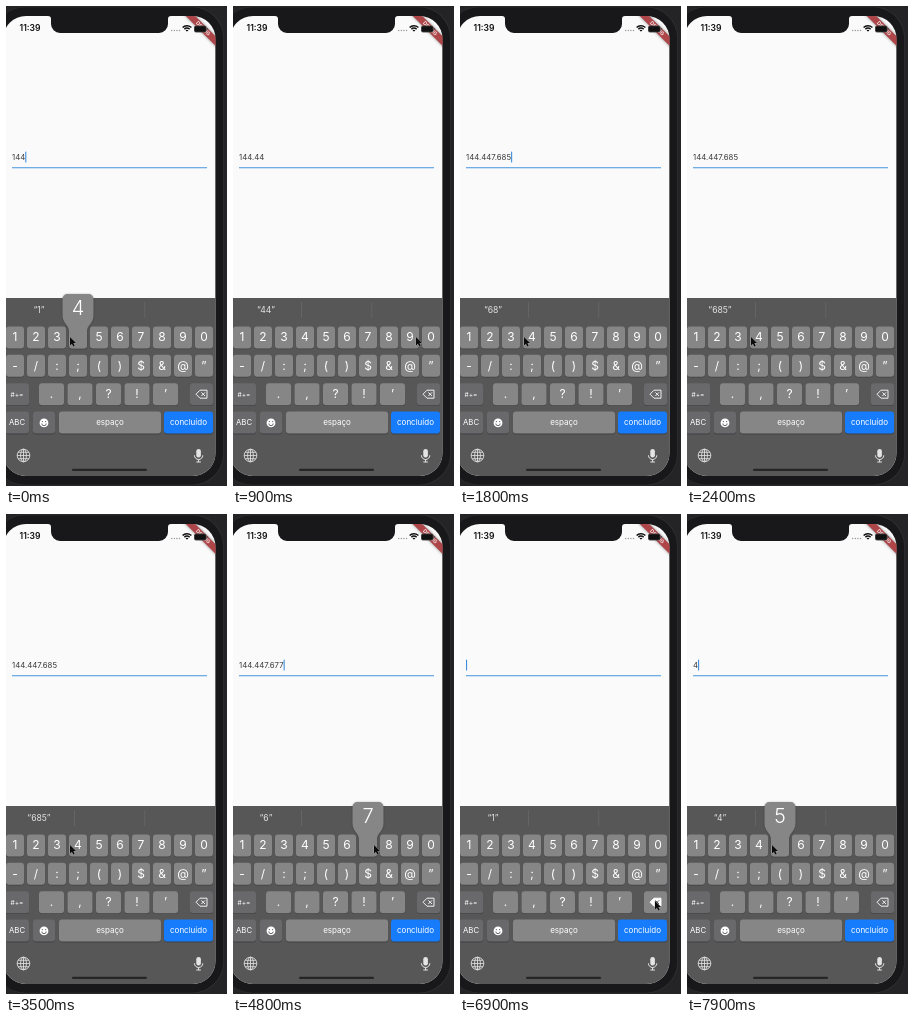
An HTML page with a canvas for the animation above (8 s loop, 221 by 480 pixels).

```html
<!DOCTYPE html>
<html lang="pt">
<head>
<meta charset="utf-8">
<title>Masked number field</title>
<style>
html, body { margin: 0; width: 100%; height: 100%; overflow: hidden; background: #18181a; }
canvas { display: block; width: 221px; height: 480px; }
</style>
</head>
<body>
<canvas id="stage"></canvas>
<script>
const W = 221, H = 480, LOOP = 8000, STEP = 100;
const SANS = "Inter, 'Liberation Sans', sans-serif";
const KEY = "#868687", DARK_KEY = "#69696b", BOARD = "#575758", BLACK = "#18181a", ICON = "#e4e4e4";
const SCREEN_W = 209.6;
const rowY = row => 320.4 + 28.4 * row;

const canvas = document.getElementById("stage");
const ratio = window.devicePixelRatio || 1;
canvas.width = W * ratio;
canvas.height = H * ratio;
const c = canvas.getContext("2d");
c.scale(ratio, ratio);

// Every press drives the field, the lit key and the pointer; "<" erases.
const run = (keys, start, gap) => [...keys].map((key, i) => ({ key, at: start + i * gap }));
const presses = [
  ...run("4444", -200, 100),
  ...run("9", 500),
  ...run("7685", 1000, 200),
  ...run("4", 2000),
  ...run("<<", 3600, 200),
  ...run("77", 4600, 100),
  ...run("<", 5600),
  ...run("<".repeat(10), 5900, 100),
  ...run("45", 7600, 300)
];
const entered = t => presses.filter(p => p.at + 100 <= t);
const isLit = (p, t) => t >= p.at && t - p.at < (p.key === "<" ? 300 : 200);
const digitX = digit => digit * 21 - 12;

function digitsAt(t) {
  return entered(t).reduce((s, { key }) => key === "<" ? s.slice(0, -1) : s + key, "1");
}

function mask(digits) {
  const groups = (digits.slice(0, 9).match(/.{1,3}/g) || []).join(".");
  return digits.length > 9 ? groups + "-" + digits.slice(9) : groups;
}

// The tip rests on the outer side of the digit keys.
function tipFor(key) {
  return key === "<" ? [195, 387] : [digitX(key) + (key > 5 ? 6 : -8), 331];
}

function pointerAt(t) {
  const i = presses.findLastIndex(p => p.at <= t);
  const from = presses[i], to = presses[i + 1] || from;
  const travel = Math.min(500, (to.at - from.at) / 2) || 1;
  const u = Math.min(1, Math.max(0, (t - from.at - 100) / travel));
  const ease = 1 - (1 - u) ** 3;
  const [x0, y0] = tipFor(from.key), [x1, y1] = tipFor(to.key);
  return [x0 + (x1 - x0) * ease, y0 + (y1 - y0) * ease];
}

function box(x, y, w, h, r, fill) {
  c.beginPath();
  c.roundRect(x, y, w, h, r);
  c.fillStyle = fill;
  c.fill();
}

function disc(x, y, r, fill) {
  box(x - r, y - r, 2 * r, 2 * r, r, fill);
}

function line(color, width, ...pts) {
  c.beginPath();
  pts.forEach(p => c.lineTo(...p));
  c.strokeStyle = color;
  c.lineWidth = width;
  c.stroke();
}

function arc(x, y, r, from, to, color, width) {
  c.beginPath();
  c.arc(x, y, r, from, to);
  c.strokeStyle = color;
  c.lineWidth = width;
  c.stroke();
}

function label(text, x, y, font, color = "#fff", align = "center") {
  c.font = font;
  c.fillStyle = color;
  c.textAlign = align;
  c.textBaseline = "middle";
  c.fillText(text, x, y);
}

function key(text, x, row, w, size = 12, fill = KEY) {
  const y = rowY(row);
  box(x, y + .8, w, 22, 3, "#414142");
  box(x, y, w, 22, 3, fill);
  label(text, x + w / 2, y + 11.4, `${size}px ${SANS}`);
}

function ribbon() {
  c.save();
  c.translate(197, 22.5);
  c.rotate(Math.PI / 4);
  c.shadowColor = "rgba(0,0,0,.5)";
  c.shadowBlur = 3;
  c.fillStyle = "#ae4548";
  c.fillRect(-30, -3.3, 60, 6.6);
  c.shadowBlur = 0;
  label("DEBUG", 0, .2, `bold 5.2px ${SANS}`, "#f1dede");
  c.restore();
}

function statusBar() {
  label("11:39", 24, 22.9, `600 8.6px ${SANS}`, "#111");
  for (let i = 0; i < 4; i++) disc(165.7 + i * 2.6, 24.4, .75, "#999");
  for (const r of [1.2, 3.6, 6]) arc(181, 25.7, r, -Math.PI * .76, -Math.PI * .24, "#111", 1.5);
  box(188, 19.5, 12.5, 7, 2, "#555");
  box(188.7, 20.2, 11.1, 5.6, 1.4, "#111");
  box(200.9, 21.7, .9, 2.5, .5, "#555");
}

function notch() {
  const left = 45, right = 162, top = 10, flare = 3;
  c.beginPath();
  c.roundRect(left, top - 10, right - left, 27, 9);
  for (const [x, side] of [[left, -1], [right, 1]]) {
    c.moveTo(x + side * flare, top);
    c.quadraticCurveTo(x, top, x, top + flare);
    c.lineTo(x, top);
  }
  c.fillStyle = BLACK;
  c.fill();
}

function field(t) {
  const text = mask(digitsAt(t));
  label(text, 6, 151.4, `7.8px ${SANS}`, "#3a3a3a", "left");
  const end = 6 + c.measureText(text).width;
  const idle = t - entered(t).pop().at - 100;
  if (Math.floor(idle / 500) % 2 === 0) box(end, 145.5, 1.1, 11, .5, "#3d8edc");
  box(6, 161.2, 195, 1.1, 0, "#4293dc");
}

function eraseKey(lit) {
  const y = rowY(2) + 11;
  key("", 184, 2, 23, 8, lit ? KEY : DARK_KEY);
  c.beginPath();
  [[190, 0], [194, -4], [201, -4], [201, 4], [194, 4]].forEach(([x, dy]) => c.lineTo(x, y + dy));
  c.closePath();
  c.lineJoin = "round";
  c.strokeStyle = c.fillStyle = "#fff";
  c.lineWidth = .9;
  c.stroke();
  if (lit) c.fill();
  for (const d of [-1.8, 1.8]) line(lit ? "#444" : "#fff", .9, [195.4, y - d], [199, y + d]);
}

function smiley() {
  const y = rowY(3) + 11.3;
  key("", 27, 3, 22, 8, DARK_KEY);
  disc(38, y, 4.4, "#fff");
  for (const x of [36.4, 39.6]) disc(x, y - 1.3, .7, DARK_KEY);
  arc(38, y + .6, 2.2, 0, Math.PI, DARK_KEY, 1);
}

function globe() {
  const x = 17.5, y = 449.5, r = 6.3;
  for (const rx of [r, r * .46]) {
    c.beginPath();
    c.ellipse(x, y, rx, r, 0, 0, 7);
    c.strokeStyle = ICON;
    c.lineWidth = .85;
    c.stroke();
  }
  line(ICON, .85, [x, y - r], [x, y + r]);
  for (const dy of [-3.2, 0, 3.2]) {
    const half = Math.sqrt(r * r - dy * dy);
    line(ICON, .8, [x - half, y + dy], [x + half, y + dy]);
  }
}

function microphone() {
  const x = 192.6;
  box(x - 2.3, 443, 4.6, 8.5, 2.3, ICON);
  arc(x, 449.3, 4.2, 0, Math.PI, ICON, 1);
  line(ICON, 1, [x, 453.5], [x, 456]);
  line(ICON, 1, [x - 2.3, 456], [x + 2.3, 456]);
}

function keyboard(t) {
  box(0, 292, SCREEN_W, 180, 0, BOARD);
  for (const x of [68, 138.5]) box(x, 296, .7, 16, 0, "#6a6a6b");
  const word = mask(digitsAt(t - 200)).split(".").pop();
  if (word) label(`“${word}”`, 33, 304, `8.6px ${SANS}`, "#e2e2e2");

  [..."1234567890"].forEach((k, i) => key(k, 21 * i, 0, 18));
  [..."-/:;()$&@”"].forEach((k, i) => key(k, 21 * i, 1, 18));
  key("#+=", -1, 2, 24, 6.6, DARK_KEY);
  [...".,?!’"].forEach((k, i) => key(k, 33 + 28.5 * i, 2, 25));
  eraseKey(presses.some(p => p.key === "<" && isLit(p, t)));
  key("ABC", -1, 3, 24, 7.8, DARK_KEY);
  smiley();
  key("espaço", 53, 3, 102, 8);
  key("concluído", 158, 3, 49, 8, "#177cfb");
  globe();
  microphone();
  box(66, 462.7, 75, 2.3, 1.1, "#262627");
}

function popup(digit) {
  const x = digitX(digit), wide = 15.5, slim = 9;
  c.save();
  c.shadowColor = "rgba(0,0,0,.3)";
  c.shadowBlur = 2;
  c.beginPath();
  c.roundRect(x - wide, 288, 2 * wide, 26, 5);
  c.roundRect(x - slim, 312, 2 * slim, 30.4, 3);
  c.moveTo(x - wide, 309);
  c.lineTo(x + wide, 309);
  c.bezierCurveTo(x + wide, 318, x + slim, 318, x + slim, 326);
  c.lineTo(x - slim, 326);
  c.bezierCurveTo(x - slim, 318, x - wide, 318, x - wide, 309);
  c.fillStyle = KEY;
  c.fill();
  c.restore();
  label(digit, x, 302.5, `300 20px ${SANS}`);
}

function pointer(x, y) {
  c.beginPath();
  [[0, 0], [0, 8.4], [1.9, 6.7], [3.3, 9.6], [4.7, 9], [3.4, 6.1], [6, 5.9]]
    .forEach(([dx, dy]) => c.lineTo(x + dx, y + dy));
  c.closePath();
  c.lineJoin = "round";
  c.strokeStyle = "#aaa";
  c.lineWidth = .8;
  c.stroke();
  c.fillStyle = "#0c0c0c";
  c.fill();
}

function phoneBody() {
  box(0, 0, W, H, 0, "#242426");
  box(-12, .5, 230, 479, 32, "#303032");
  box(-12, 1.3, 229.2, 477.4, 31, BLACK);
}

function draw(t) {
  phoneBody();
  c.save();
  c.beginPath();
  c.roundRect(-3, 10, SCREEN_W + 3, 460, 23);
  c.clip();
  box(0, 0, SCREEN_W, H, 0, "#fafafa");
  ribbon();
  statusBar();
  notch();
  field(t);
  keyboard(t);
  const press = presses.findLast(p => p.key !== "<" && isLit(p, t));
  if (press) popup(press.key);
  c.restore();
  pointer(...pointerAt(t));
}

const start = performance.now();
function tick() {
  const t = (performance.now() - start) % LOOP;
  draw(Math.floor(t / STEP) * STEP);
  requestAnimationFrame(tick);
}
tick();
</script>
</body>
</html>
```
